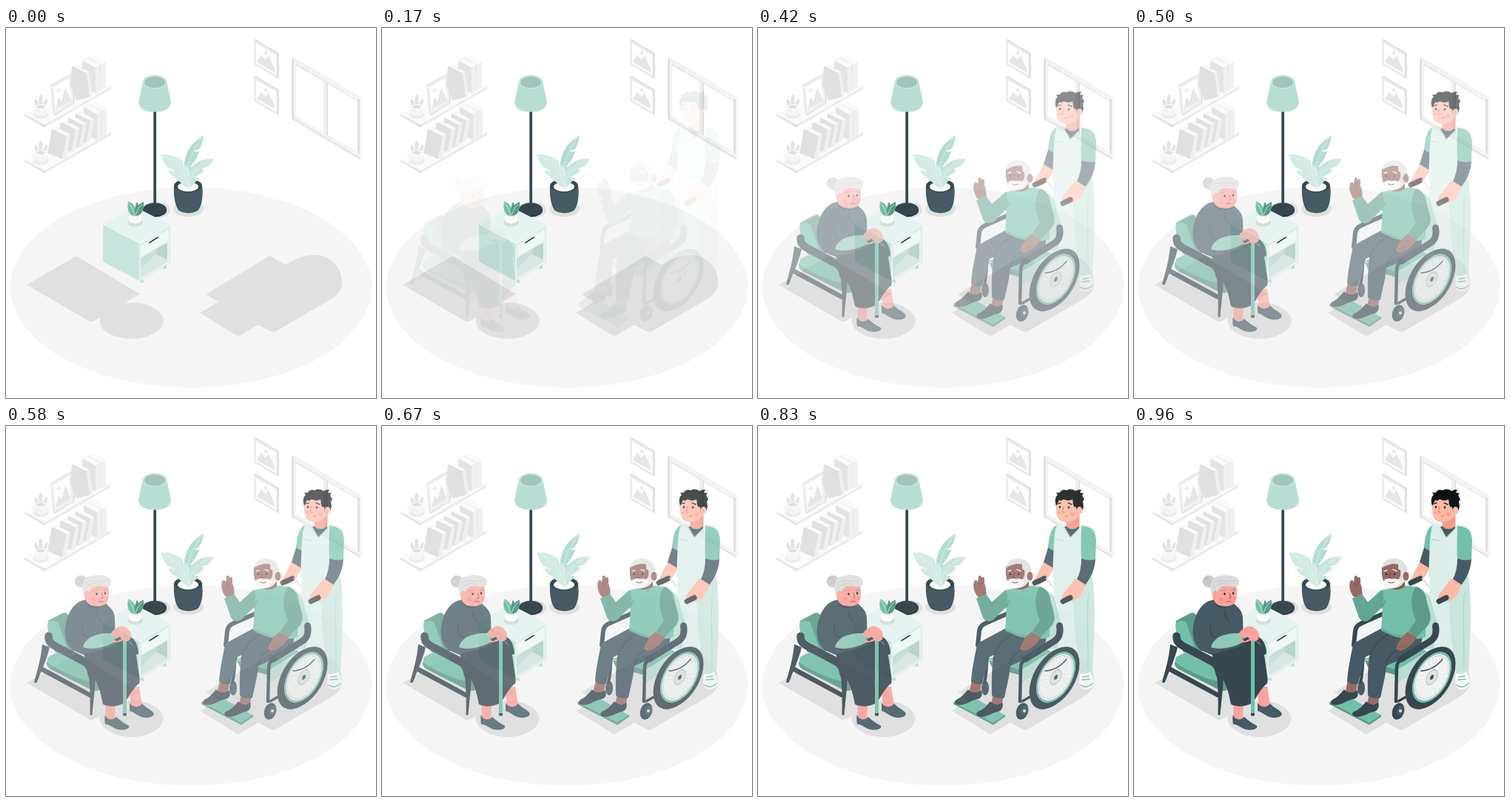
An HTML page that plays this animation: 500x500 px, repeating every 1 s.

```html
<!DOCTYPE html>
<html lang="en">
<head>
<meta charset="utf-8">
<title>Care at home</title>
<style>
html, body { margin: 0; width: 100%; height: 100%; overflow: hidden; background: #fff; }
svg { display: block; width: 100%; height: 100%; }
.person { animation: appear 1s infinite; }
@keyframes appear {
  0% { opacity: 0; animation-timing-function: step-end; }
  17% { opacity: .07; animation-timing-function: steps(6); }
  42% { opacity: .48; animation-timing-function: steps(2); }
  50% { opacity: .58; animation-timing-function: steps(2); }
  58% { opacity: .67; animation-timing-function: steps(4); }
  75% { opacity: .84; animation-timing-function: steps(5); }
  96%, 100% { opacity: 1; }
}
.slate { fill: #455a64; }
.dark { fill: #37474f; }
.teal { fill: #73bfa9; }
.deep { fill: #5b9b89; }
.mint { fill: #dceeea; }
.rose { fill: #fba39c; }
.peach { fill: #ffb9a4; }
.brown { fill: #976a63; }
.shade { fill: #e0e0e0; }
.line { fill: none; stroke: #37474f; stroke-linecap: round; stroke-linejoin: round; }
.thin { fill: none; stroke-linecap: round; stroke-linejoin: round; }
</style>
</head>
<body>
<svg viewBox="0 0 500 500">
  <defs>
    <g id="shelf">
      <path fill="#fafafa" d="M25 116 115 64 142 80 52 132Z"/>
      <path fill="#e3e3e3" d="M25 116 52 131v3.500L25 118.500Z"/>
      <path fill="#ebebeb" d="M52 131 142 79v3.500L52 134.500Z"/>
    </g>
    <g id="cactus">
      <ellipse cx="47" cy="117" rx="10.500" ry="5.500" fill="#ebebeb"/>
      <path fill="#e3e3e3" d="M45 108C44 99 44 90 47 90S50 100 49 109ZM42 107C37 101 38 96 40 96S44 102 45 107ZM50 107C51 98 54 95 56 96 57 101 53 105 51 108Z"/>
      <path fill="#f5f5f5" d="M38 107v7c0 7 18 7 18 0v-7Z"/>
      <ellipse cx="47" cy="107" rx="9" ry="4" fill="#fafafa"/>
      <path fill="#e0e0e0" d="M41 107c1-4 11-4 12 0-2 2.500-10 2.500-12 0Z"/>
    </g>
    <g id="book">
      <path fill="#e4e4e4" d="M0 0 18 10V45L0 35Z"/>
      <path fill="#fafafa" d="M0 0 6-3.500 24 6.500 18 10Z"/>
      <path fill="#f0f0f0" d="M18 10 24 6.500V41.500L18 45Z"/>
    </g>
    <g id="leanbook">
      <path fill="#e0e0e0" d="M6 0 26 10 20 41 0 33Z"/>
      <path fill="#fafafa" d="M6 0 10-3 31 8 26 10Z"/>
      <path fill="#f0f0f0" d="M26 10 31 8 26 38 20 41Z"/>
    </g>
    <g id="photo">
      <path fill="#e0e0e0" d="M335 16 337 15 369 34V67L367 68 335 49Z"/>
      <path fill="#ebebeb" d="M335 16 367 35V68L335 49Z"/>
      <path fill="#fff" d="M337.500 20.500 365 36.500V63.500L337.500 47.500Z"/>
      <path fill="#e6e6e6" d="M339 46 345 36 350 43 355 37 363 55V60Z"/>
      <circle cx="351" cy="34" r="2.300" fill="#e8e8e8"/>
    </g>
  </defs>

  <!-- wall -->
  <use href="#shelf"/>
  <use href="#cactus"/>
  <path fill="#e0e0e0" d="M60 77 88 61.500 91 63 93 101 67 118 64 117Z"/>
  <path fill="#f0f0f0" d="M61 78 88 63 91 101 65 117Z"/>
  <path fill="#fff" d="M64 80 85.500 68 88 98 67.500 111Z"/>
  <path fill="#e6e6e6" d="M67 109 71 94 75 99 80 80 88 98 68 110Z"/>
  <circle cx="71.500" cy="84" r="2.500" fill="#ebebeb"/>
  <use href="#book" x="110.500" y="39.500"/>
  <use href="#book" x="103" y="43.500"/>
  <path fill="#e0e0e0" d="M89 51 109 61 114 93 95 98 87 78Z"/>
  <path fill="#fafafa" d="M89 51 92 49 112 59 109 61Z"/>
  <path fill="#f0f0f0" d="M109 61 112 59 117 91 113 94Z"/>
  <use href="#shelf" y="62"/>
  <use href="#cactus" y="62"/>
  <use href="#book" x="112" y="102.500"/>
  <use href="#book" x="105" y="106.500"/>
  <use href="#leanbook" x="88" y="115"/>
  <use href="#leanbook" x="78" y="121"/>
  <use href="#leanbook" x="68" y="127"/>
  <use href="#leanbook" x="56" y="136"/>
  <use href="#photo"/>
  <use href="#photo" y="49.500"/>
  <path fill="#e6e6e6" fill-rule="evenodd" d="M386 42 389 40 480 94V176L478 178 386 123ZM391 50V120L475 169V99Z"/>
  <path fill="#f3f3f3" fill-rule="evenodd" d="M389 40 480 94V176L389 122ZM391.500 48V119L475 168V98Z"/>
  <path fill="#e0e0e0" d="M386 42 389 40.500V122L386 123ZM475 97 478 96V171L475 169Z"/>
  <path fill="#f0f0f0" d="M429 71 435 75V145L429 142Z"/>
  <path fill="#e0e0e0" d="M433 73.500 435 75V145L433 144Z"/>

  <!-- floor -->
  <ellipse cx="250" cy="350.500" rx="244" ry="135.500" fill="#f5f5f5"/>
  <g class="shade">
    <path d="M28 347 92 310Q95 308 98 310L181 359.500 118 396.500Q115 398 112 396Z"/>
    <ellipse cx="169.500" cy="395.500" rx="43" ry="24.500"/>
    <path d="M262 385 287 370 270 360 356 308 378 320C386 315 399 307 416 307 440 306 455 325 454 347 453 357 447 361 440 366L364 410Q360 412 356 409L341 401 317 415Q314 417 311 415Z"/>
    <ellipse cx="204" cy="246" rx="18" ry="10.500"/>
    <ellipse cx="246.500" cy="244.500" rx="20.500" ry="10.500"/>
  </g>

  <!-- lamp -->
  <ellipse cx="201" cy="246.500" rx="16" ry="9" fill="#263238"/>
  <ellipse cx="201" cy="245" rx="16" ry="9" class="dark"/>
  <path fill="#37474f" d="M199.300 108h3.700v136q-1.800 1.500-3.700 0Z"/>
  <path fill="#b8ded3" d="M185 72 179 100C179 109 189 113.500 201 113.500S223 109 223 100L217 72Z"/>
  <ellipse cx="201" cy="73" rx="16.500" ry="9.300" fill="#c9e6de"/>
  <ellipse cx="201" cy="73.200" rx="14" ry="7.800" fill="#a0c6bc"/>

  <!-- plant -->
  <path class="slate" d="M227 213C226 229 229 240 233 246 239 251.500 254 251.500 260 246 264 240 267 229 265 213Z"/>
  <ellipse cx="246" cy="213" rx="19" ry="9" class="dark"/>
  <ellipse cx="246" cy="214.500" rx="14" ry="6.500" fill="#fff"/>
  <path fill="#b4dcd2" d="M244 213C238 193 240 176 247 164 252 155 260 150 267 145 266 153 264 159 261 163L254 167 261 167C259 173 257 178 253 182L249 188 254 187C254 197 250 207 249 216Z"/>
  <path fill="#c9e6de" d="M247 217C242 204 245 193 254 185 262 178 271 176 281 177 277 183 274 187 271 188L264 190 268 192C264 197 259 200 254 202L261 203C256 209 251 212 249 217Z"/>
  <path fill="#d4ebe5" d="M247 217C242 216 238 211 234 207L230 207 232 204C226 202 221 198 219 192L229 194 217 188C213 183 211 176 209 171 219 170 231 173 239 180L240 189 243 184C250 193 249 207 249 217Z"/>
  <path class="thin" stroke="#eaf5f2" stroke-width=".8" d="M246 200C245 180 252 164 265 148M248 215C248 197 260 184 278 178M247 215C243 195 231 182 211 172"/>

  <!-- side table -->
  <path fill="#bddfd5" d="M181 338 186 341V345L181 343ZM211 320 217 317V324L213 326Z"/>
  <path fill="#c8e5dd" d="M131 265 181 291V342L133 317Q131 316 131 313Z"/>
  <path fill="#dceeea" d="M181 291 222 266V317L181 342Z"/>
  <path fill="#e7f3f0" d="M131 265 169 243Q172 241 175 242L222 266 181 291Z"/>
  <path fill="#f0f8f6" d="M183 294 219 273V288L183 309Z"/>
  <path fill="#c9dfd9" d="M182 311 218 290V318L182 338Z"/>
  <path fill="#d8e7e3" d="M182 338V326L203 305 218 313V318Z"/>
  <path fill="#b8d4cb" d="M203 299 218 290V313L203 305Z"/>
  <path class="thin" stroke="#f0f8f6" stroke-width="1.300" d="M131 265 181 291 222 266M181 291V341M219 273V319M183 338 218 317"/>
  <path class="line" stroke-width="1.800" d="M194 290 205 283"/>
  <ellipse cx="174.500" cy="263" rx="10.500" ry="5.800" fill="#d2dfdb"/>
  <path fill="#fafafa" d="M166 252V259C167 266 182 266 183 259V252Z"/>
  <ellipse cx="174.500" cy="252.500" rx="8.500" ry="4" fill="#f0f0f0"/>
  <path class="teal" d="M174 254C166 254 163 245 165 234 173 237 178 245 175 254Z"/>
  <path class="deep" d="M174 254C174 244 179 237 186 235 187 247 183 254 174 254ZM174 253C173 244 176 238 177 235 180 238 180 244 175 253Z"/>
  <path class="thin" stroke="#d0e9e2" stroke-width=".9" d="M174 253C172 245 169 240 166 236M175 253C177 246 181 240 184 238"/>

  <!-- woman -->
  <g class="person">
    <path class="line" stroke-width="6" d="M160 285C171 287 175 294 176 306"/>
    <path class="deep" d="M57 263 76 253Q81 251 84 255L94 304 67 306Q56 288 57 263Z"/>
    <path class="teal" d="M56 266Q63 260 71 266L84 305 67 302Q56 288 56 266Z"/>
    <path class="teal" d="M57 312 82 300 145 330 128 355Q123 359 116 355L59 325Q54 320 57 312Z"/>
    <path class="deep" d="M55 318C59 325 111 350 128 346V355Q123 360 116 357L59 328Q54 324 55 318Z"/>
    <path class="dark" d="M49 295 59 299C55 316 48 330 42 346Q40 348 38 346C42 331 47 316 49 295ZM47 324 115 361V368L44 330ZM110 325 121 331C121 352 118 372 116.500 390Q115 392 113.500 390C114 370 114 346 110 325Z"/>
    <path class="line" stroke-width="10.500" d="M57.500 284C57 294 65 297 75 302L105 318C112 322 115 327 115.500 335"/>
    <path class="rose" d="M134 371 148 376 147 396Q141 400 135 394ZM166 353 180 352 184 377Q176 382 169 378Z"/>
    <path class="slate" d="M134 390C136 397 144 399 149 393 154 398 160 402 166 405 168 409 160 412 151 410 144 408 140 403 134 403 133 398 133 394 134 390ZM167 374C171 381 180 381 184 375 188 380 194 382 199 387 202 392 194 395 187 394 179 393 174 387 167 385Z"/>
    <path class="dark" d="M102 299C118 299 140 290 158 289 172 290 176 304 178 323 179 334 182 342 180 348 173 353 168 362 162 372 155 379 140 381 131 376 128 361 125 346 113 333Z"/>
    <path class="slate" d="M106 235C93 238 84 249 80 271 78 287 83 296 90 303L104 309C120 304 139 301 148 295L147 260C147 251 142 246 135 240Z"/>
    <path class="dark" d="M107 232C106 240 113 246 121 246 128 246 133 244 135 238L130 234Z"/>
    <path class="slate" d="M108 231C106 237 112 243 120 243 127 243 132 241 133 236Z"/>
    <path class="thin" stroke="#37474f" stroke-width="1.200" d="M103 269C102 278 106 284 111 287M123 249C122 257 125 260 128 263"/>
    <path fill="#8ec8b7" d="M104 299C107 287 119 279 145 280L149 291C133 300 117 303 104 299Z"/>
    <path class="line" stroke-width="4" d="M148 289 159 286 170 291"/>
    <path class="teal" d="M158 288h5v102q-2.500 2-5 0Z"/>
    <path class="dark" d="M158 388h5v3q-2.500 2-5 0Z"/>
    <path class="rose" d="M141 282C145 274 153 269 159 271 167 274 171 281 168 288 164 293 160 291 157 290 151 293 146 293 143 291L148 287Z"/>
    <path class="thin" stroke="#ea8f87" stroke-width=".8" d="M150 276C157 276 161 280 163 284M146 285 154 286 158 290"/>
    <path class="dark" d="M147 288 154 285 156 288 149 291Z"/>
    <circle cx="101" cy="210" r="8.300" fill="#c7c7c7"/>
    <path class="thin" stroke="#b3b3b3" stroke-width="1" d="M96 206C101 205 105 210 104 215"/>
    <path class="rose" d="M105 219C105 231 107 238 114 242 123 245 132 244 136 239 140 232 140 222 137 211L119 208Z"/>
    <path fill="#dbdbdb" d="M104 224C101 214 104 206 113 203 125 199 140 202 142 209 143 214 140 217 137 217 130 218 123 214 117 218L112 224 109 222 107 231C104 229 104 227 104 224Z"/>
    <path class="thin" stroke="#c7c7c7" stroke-width="1" d="M105 212C116 206 130 212 139 209M107 220C112 213 120 211 127 214"/>
    <ellipse cx="109.500" cy="229" rx="3.500" ry="5" class="rose"/>
    <g fill="#f27f78"><circle cx="118" cy="234" r="2.700" opacity=".5"/><circle cx="135.500" cy="233" r="2.200" opacity=".5"/></g>
    <g fill="#263238"><ellipse cx="122.500" cy="227" rx="1.300" ry="1.700"/><ellipse cx="134" cy="226" rx="1.300" ry="1.700"/></g>
    <path class="thin" stroke="#c9524c" stroke-width="1.100" d="M129 226 131 232 128 232.500M125 237.500Q128 236 131 238"/>
    <path class="thin" stroke="#9e9e9e" stroke-width="1.300" d="M118 223 123 221M132 221 137 222"/>
  </g>

  <!-- nurse -->
  <g class="person">
    <path class="mint" d="M400 200C398 236 400 270 407 334L425 337 434 250 430 205Z"/>
    <path fill="#c8e4dc" d="M424 208C425 250 430 298 434 338Q443 342 452 337C453 300 458 252 452 203Z"/>
    <path class="thin" stroke="#a9d2c6" stroke-width="1" d="M447 226C444 240 446 280 446 328"/>
    <path fill="#fafafa" d="M435 334C434 343 434 350 437 354 443 358 450 355 453 350 454 343 451 337 449 332 444 335 439 336 435 334Z"/>
    <path class="thin" stroke="#73bfa9" stroke-width="1.400" d="M436 350Q443 356 452 348M439 339 447 338M438 343 448 342"/>
    <path class="slate" d="M394 158 408 166 402 190Q394 202 388 194L385 187Z"/>
    <path class="peach" d="M386 184 399 192C395 203 388 212 379 214 373 215 371 210 375 205Z"/>
    <path class="teal" d="M403 134C395 139 393 152 392 164Q399 170 407 168L414 145Z"/>
    <path class="mint" d="M405 133C399 140 400 165 398 204 413 213 433 213 446 207L456 142C449 137 439 134 434 133Z"/>
    <path class="teal" d="M437 135C449 135 456 140 457 154L456 180Q446 184 437 179C436 163 437 150 437 135Z"/>
    <path class="slate" d="M437 179Q447 183 456 180C455 195 449 207 442 215L431 207Q437 195 437 179ZM414 136 433 133 434 138 422 150Z"/>
    <path class="peach" d="M429 206 442 214C439 226 433 235 424 237 417 239 410 235 411 229Z"/>
    <path class="thin" stroke="#a9d2c6" stroke-width="1.200" d="M402 153 412 155"/>
    <path class="thin" stroke="#a9d2c6" stroke-width=".8" d="M414 139 422 151 434 139"/>
    <path fill="#f49b88" d="M416 125 434 120V135C428 141 421 140 417 136Z"/>
    <path class="peach" d="M403 99C402 113 403 125 409 128 417 132 427 129 433 122L437 105 426 94Z"/>
    <path fill="#0d1315" d="M403 108C401 103 401 96 405 93L403 90 408 90C409 87 413 85 417 87 422 84 427 86 429 88 432 86 435 86 437 86L435 90 440 91 438 94 441 99 439 102 440 109 437 118 434 118 431 116 430 109 428 110C425 106 426 103 425 99 420 102 416 100 413 99L410 101 407 100Z"/>
    <ellipse cx="434.500" cy="114" rx="3.800" ry="5" class="peach"/>
    <g fill="#f58d7d" opacity=".5"><circle cx="407" cy="117" r="2.300"/><circle cx="425" cy="119" r="3"/></g>
    <g fill="#263238"><ellipse cx="408" cy="109.500" rx="1.300" ry="1.700"/><ellipse cx="420" cy="110" rx="1.300" ry="1.700"/></g>
    <path class="thin" stroke="#263238" stroke-width="1.500" d="M405 105 409 104M419 104 424 106"/>
    <path class="thin" stroke="#d9725f" stroke-width="1" d="M413 109 411 116 414 117M415 122Q418 123 420 120"/>
  </g>

  <!-- man in wheelchair -->
  <g class="person">
    <path class="line" stroke-width="7" d="M374 212 387 206M412 237 422 232"/>
    <path class="thin" stroke="#e0e0e0" stroke-width="2.500" d="M344 340 327 374M354 349 333 386M306 343 292 365M390 206 398 217"/>
    <ellipse cx="307" cy="354" rx="5" ry="10" class="slate"/>
    <path fill="#b8ded3" d="M387 220 399 229 410 266 405 301 371 304Z"/>
    <path class="line" stroke-width="6" d="M297 296 299 277C300 270 304 268 311 265L336 254"/>
    <path class="line" stroke-width="4" d="M311 295C308 310 311 328 306 346"/>
    <path class="teal" d="M312 315 365 290 397 305 359 332Z"/>
    <path class="deep" d="M312 316 359 331V338L316 326Z"/>
    <path fill="#b8ded3" d="M355 330 402 301V320L356 347Z"/>

    <path class="teal" d="M264 373 283 362 334 391 318 402Z"/>
    <path class="deep" d="M264 373 318 401 334 390V393L318 404 264 376Z"/>
    <path class="brown" d="M289 343 302 346 300 361Q292 364 286 358ZM318 361 332 365 329 378Q321 382 315 377Z"/>
    <path class="dark" d="M284 356C290 362 297 361 302 357 304 363 302 368 297 369 288 370 282 377 272 377 266 377 264 373 268 370 274 367 279 362 284 356ZM314 372C320 378 326 378 330 373 332 379 330 384 325 386 316 387 311 393 302 393 296 393 293 389 297 386 305 383 309 378 314 372Z"/>
    <path class="slate" d="M335 273C323 280 304 289 296 295 293 311 289 328 288 345Q295 351 303 348C306 334 311 322 313 312L363 291Z"/>
    <path class="slate" d="M337 276C326 290 318 302 319 311 315 330 316 345 316 364Q324 370 333 367C337 348 340 337 341 324L382 306Q392 291 388 281Z"/>
    <path class="thin" stroke="#37474f" stroke-width="1.300" d="M341 323C341 312 350 305 362 300M336 287 344 281M318 318C319 304 326 294 336 286"/>

    <path class="brown" d="M297 231C292 225 290 216 292 210 294 207 296 208 297 211L298 203C299 201 302 202 302 205L304 204C307 205 306 210 306 213 309 219 308 225 309 231Z"/>
    <path class="thin" stroke="#764c48" stroke-width=".8" d="M298 211 300 217M302 206 302 215"/>
    <path class="teal" d="M334 222C344 219 356 219 366 216 381 215 393 220 395 231L394 285C378 292 350 286 334 276L336 244Z"/>
    <path fill="#62a592" d="M295 233 308 227 316 238 335 221C337 228 338 235 337 243L318 262Q309 267 304 259Z"/>
    <path class="thin" stroke="#5b9b89" stroke-width="1.300" d="M335 246 340 236M336 275C345 281 355 284 365 284"/>
    <path class="deep" d="M381 217C392 219 395 233 398 246 402 257 402 266 394 273L381 286 371 277 381 263C375 248 372 231 381 217Z"/>
    <path class="brown" d="M370 278 382 286C379 292 373 297 367 301 362 304 357 305 354 301 357 291 362 284 370 278Z"/>
    <path class="thin" stroke="#764c48" stroke-width=".8" d="M358 300 366 293M362 302 369 295"/>
    <path fill="#85594f" d="M346 212 366 203 366 217Q357 224 345 219Z"/>
    <path class="brown" d="M335 190C334 202 336 211 341 215 352 219 362 214 367 206L366 188 350 182Z"/>
    <path fill="#e0e0e0" d="M335 192C336 184 342 179 351 179 363 179 370 187 369 197L367 208C364 214 359 218 352 219 345 221 339 218 337 213L338 208 346 206 354 209C359 207 361 203 360 195L357 193 357 187C349 185 341 188 335 192Z"/>
    <ellipse cx="367.500" cy="203" rx="4" ry="6" class="brown"/>
    <path fill="#f5f5f5" d="M337 210C340 205 345 206 348 207 353 205 357 208 361 209 358 216 353 219 346 219 340 218 337 215 337 210Z"/>
    <path class="thin" stroke="#764c48" stroke-width="1.200" d="M347 199 344 204 347 205M344 211Q348 213 351 211"/>
    <g fill="#263238"><circle cx="341" cy="200" r="1.300"/><circle cx="352" cy="200" r="1.300"/></g>
    <path class="thin" stroke="#e6e6e6" stroke-width="1.400" d="M338 196 342 195M350 194 355 196"/>

    <path class="line" stroke-width="4.500" d="M354 372 355 327C355 319 359 317 365 313L401 292"/>
    <path class="line" stroke-width="9" d="M361 315 400 291C408 286 409 279 407.500 270"/>
    <path class="line" stroke-width="3.500" d="M357 372 371 364"/>
    <ellipse cx="357" cy="385.500" rx="8" ry="11.500" class="dark" transform="rotate(18 357 385.500)"/>
    <ellipse cx="360" cy="384.500" rx="4.500" ry="7" class="slate" transform="rotate(18 360 384.500)"/>
    <circle cx="360" cy="385" r="2" fill="#e0e0e0"/>
    <g transform="matrix(.866 -.5 0 1 399 341)"><circle r="37.500" class="dark"/></g>
    <g transform="matrix(.866 -.5 0 1 402.500 339.500)">
      <circle r="37" class="dark"/>
      <circle r="30.500" fill="#f2f4f4"/>
      <circle r="14" fill="none" stroke="#dbe1e0" stroke-width="26" stroke-dasharray=".45 3.220"/>
      <circle r="29.300" fill="none" stroke="#73bfa9" stroke-width="2.600"/>
      <circle r="26" fill="none" stroke="#d0d8d7" stroke-width="1"/>
      <circle r="9" fill="#e0e5e4" stroke="#b0bcbc" stroke-width="1"/>
      <circle r="3" class="slate"/>
    </g>
    <path class="line" stroke-width="1.300" d="M388 331C401 330 410 324 417 315"/>
  </g>
</svg>
</body>
</html>
```
